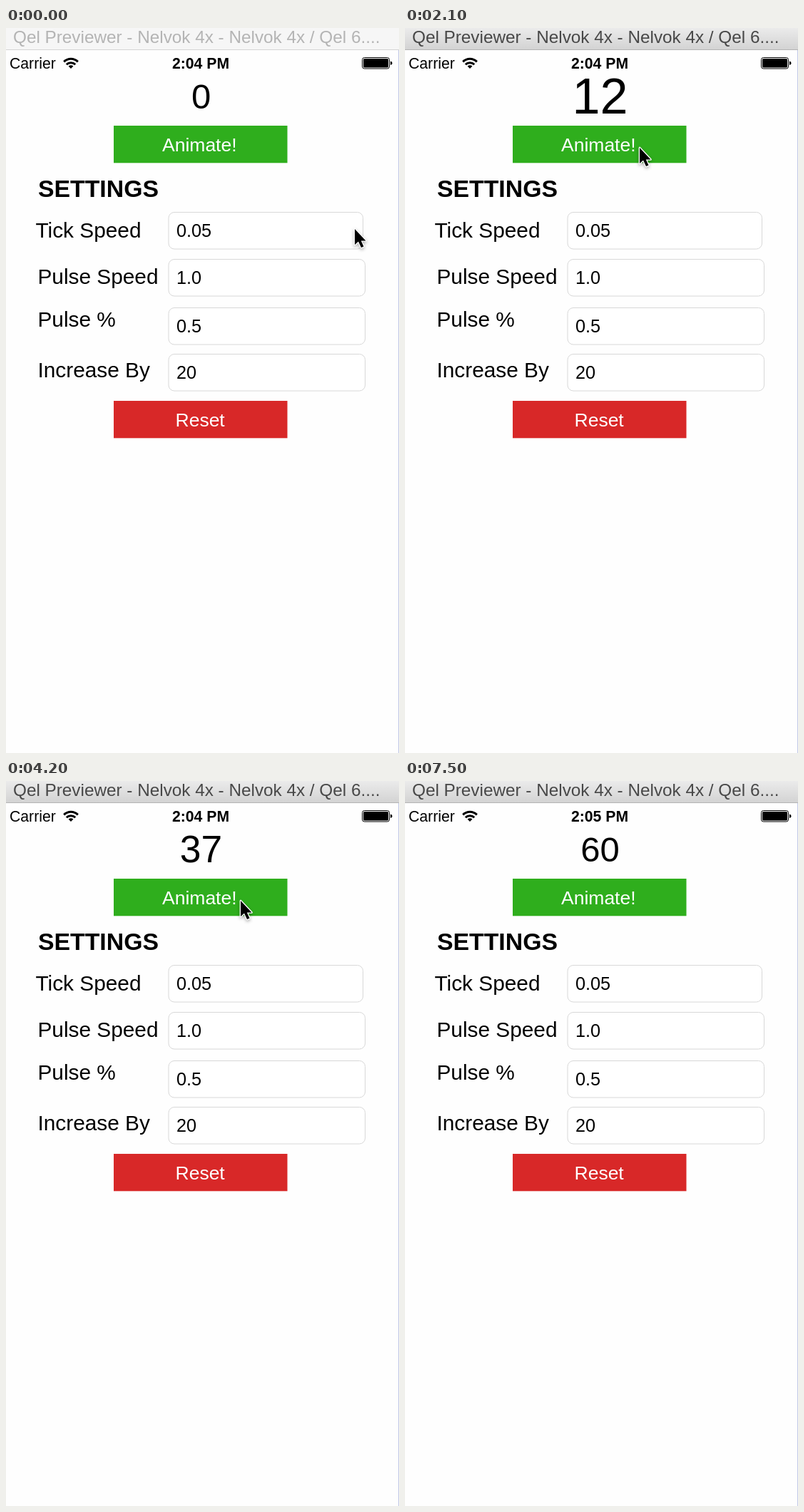
These frames come from a looping animation (551 px wide and 1017 px high, 7600 ms). An HTML page:

```html
<!DOCTYPE html>
<html lang="en">
<head>
<meta charset="utf-8">
<style>
  html, body { margin: 0; width: 100%; height: 100%; overflow: hidden; background: #fefefe; }
  svg { display: block; width: 551px; height: 1017px; font-family: "Liberation Sans", Arial, sans-serif; }
  .label { font-size: 29.8px; }
  .value { font-size: 25.2px; }
  .button { font-size: 26.5px; fill: #fff; }
  .field { fill: #fff; stroke: #d8d8d8; }
  #cursor { filter: drop-shadow(0 2px 2px rgba(0, 0, 0, .3)); }
</style>
</head>
<body>
<svg viewBox="0 0 551 1017">
  <defs>
    <linearGradient id="shade" x2="0" y2="1">
      <stop stop-color="#ebebeb"/><stop offset="1" stop-color="#d3d3d3"/>
    </linearGradient>
  </defs>

  <rect id="bar" width="551" height="30"/>
  <rect id="rule" y="30" width="551" height="1"/>
  <text id="title" x="10" y="21" font-size="24.3">Qel Previewer - Nelvok 4x - Nelvok 4x / Qel 6....</text>
  <rect x="550" y="31" width="1" height="986" fill="#c2c9e8"/>

  <text x="5" y="56.5" font-size="21.2">Carrier</text>
  <g fill="none" stroke="#000" stroke-width="3">
    <path d="M81.2 47.4a13.8 13.8 0 0 1 19.6 0M84.8 51.3a8.7 8.7 0 0 1 12.4 0"/>
    <path d="M91 57l-3.4-3.4a4.8 4.8 0 0 1 6.8 0z" fill="#000" stroke="none"/>
  </g>
  <text id="clock" x="273" y="56.5" font-size="21.2" font-weight="bold" text-anchor="middle"></text>
  <rect x="499.5" y="41.5" width="38" height="15.5" rx="3" fill="none" stroke="#000"/>
  <rect x="501" y="43" width="35" height="12.5" rx="1.5"/>
  <path d="M539 46.5q2.5 .5 2.5 2.7t-2.5 2.7z"/>

  <g id="count"><text id="number" y="17" font-size="49" text-anchor="middle"></text></g>

  <rect x="151" y="137" width="243.5" height="52.3" fill="#2fae1d"/>
  <text id="animate" class="button" x="219" y="173">Animate!</text>

  <text x="45" y="237" font-size="33.8" font-weight="bold">SETTINGS</text>
  <g class="label">
    <text x="41.5" y="294">Tick Speed</text>
    <text x="44.5" y="358.5">Pulse Speed</text>
    <text x="44.5" y="418.5">Pulse %</text>
    <text x="44.5" y="490">Increase By</text>
  </g>
  <g class="field">
    <rect x="228" y="258.5" width="272.5" height="51.5" rx="8"/>
    <rect x="228" y="324.5" width="275.5" height="51.5" rx="8"/>
    <rect x="228" y="392.5" width="275.5" height="51.5" rx="8"/>
    <rect x="228" y="457.5" width="275.5" height="51.5" rx="8"/>
  </g>
  <g class="value">
    <text x="239" y="292.5">0.05</text>
    <text x="239" y="358.5">1.0</text>
    <text x="239" y="426.5">0.5</text>
    <text x="239" y="491.5">20</text>
  </g>

  <rect x="151" y="523" width="243.5" height="52.3" fill="#d82828"/>
  <text class="button" x="237.5" y="559">Reset</text>

  <path id="cursor" d="M2 4V26L7 21.5 11 30 14.5 28.5 10.8 20.5H17.5Z"
        stroke="#fff" stroke-width="2.6" stroke-linejoin="round" paint-order="stroke"/>
</svg>
<script>
  const LOOP = 7600, TICK = 50, STEP = 20, PULSE = 1000;
  const WAKE = 1000, MINUTE = 5000;
  const clicks = [{ down: 1370, up: 1480 }, { down: 3200, up: 3340 }, { down: 5200, up: 5290 }];

  const $ = id => document.getElementById(id);
  const clamp = x => Math.min(1, Math.max(0, x));
  const ease = x => x * x * (3 - 2 * x);
  const span = (t, from, to) => clamp((t - from) / (to - from));

  function cursorAt(t) {
    const come = ease(span(t, 50, 750)), leave = span(t, 7150, 7400) ** 2;
    return [487 - 160 * come + 98 * leave, 278 - 114 * come - 210 * leave];
  }

  function draw(t) {
    const awake = t >= WAKE;
    $('bar').setAttribute('fill', awake ? 'url(#shade)' : '#f6f6f6');
    $('rule').setAttribute('fill', awake ? '#b4b4b4' : '#d4d4d4');
    $('title').setAttribute('fill', awake ? '#484848' : '#b4b4b4');
    $('clock').textContent = t < MINUTE ? '2:04 PM' : '2:05 PM';

    let count = 0, scale = 1, alpha = 1;
    for (const { down, up } of clicks) {
      count += Math.floor(span(t, up, up + TICK * STEP) * STEP);
      scale += 0.5 * Math.sin(Math.PI * span(t, up, up + PULSE)) ** 2;
      if (t >= down) alpha = 0.25 + 0.75 * span(t, up + 50, up + 220);
    }
    $('number').textContent = count;
    $('count').setAttribute('transform', `translate(273.5 95.5) scale(${scale})`);
    $('animate').setAttribute('fill-opacity', alpha);
    $('cursor').setAttribute('transform', `translate(${cursorAt(t)})`);
  }

  const start = performance.now();
  function frame() {
    draw((performance.now() - start) % LOOP);
    requestAnimationFrame(frame);
  }
  frame();
</script>
</body>
</html>
```
